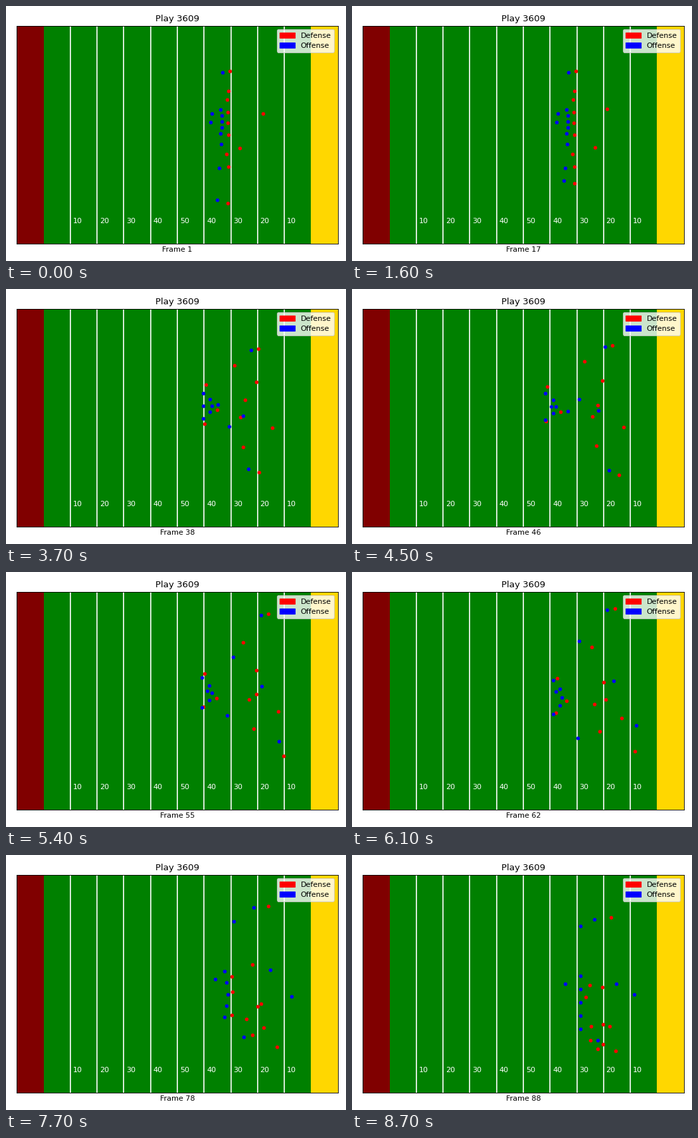
Animation of 512x384 px, one loop 8.8 s. Source, as a matplotlib script:

```python
import numpy as np
import matplotlib.pyplot as plt
from matplotlib.animation import FuncAnimation
from matplotlib.patches import Patch, Rectangle

W, H, DPI = 512, 384, 80
LEFT, RIGHT, TOP, BOTTOM = 16.35, 499.6, 29.6, 358
YARD = (RIGHT - LEFT) / 120
FRAMES, INTERVAL = 88, 100
SNAP, BREAK, END = 16, 45, FRAMES - 1


def route(*keys):
    """Smooth path from rest through (time, x, y) keys, without overshoot."""
    time = np.array([k[0] for k in keys], float)
    pts = np.array([k[1:] for k in keys], float)
    slope = np.diff(pts, axis=0) / np.diff(time)[:, None]
    a, b = slope[:-1], slope[1:]
    same = a * b > 0
    mid = np.where(same, 2 * a * b / np.where(same, a + b, 1), 0)
    tan = np.concatenate([0 * slope[:1], mid, slope[-1:]])

    def at(t):
        t = np.clip(t, time[0], time[-1])
        k = min(np.searchsorted(time, t, side="right"), len(time) - 1) - 1
        h = time[k + 1] - time[k]
        u = (t - time[k]) / h
        s = u * u * (3 - 2 * u)
        return (pts[k] * (1 - s) + pts[k + 1] * s
                + h * u * (1 - u) * ((1 - u) * tan[k] - u * tan[k + 1]))
    return at


def shadow(mark, gap, last_gap, leave):
    """Man coverage: keep a gap to the mark, then drift to another one."""
    gap, last_gap = np.array(gap), np.array(last_gap)

    def at(t):
        u = np.clip((t - leave) / (END - leave), 0, 1)
        return mark(t) + gap + (last_gap - gap) * u * u * (3 - 2 * u)
    return at


def blocker(i):
    """Lineman i places from the center; the line bows into a pocket."""
    def at(t):
        x, y = line_center(t)
        bow, spread = line_shape(t)
        return np.array([x - bow * i * i, y + spread * i])
    return at


line_center = route((SNAP, 325, 174), (BREAK, 307, 177), (END, 344, 222))
line_shape = route((SNAP, 0.5, 9), (BREAK, 4, 10), (END, 0, 20))

passer = route((SNAP, 308, 174.5), (32, 297, 175.5), (67, 309.5, 181.5), (END, 321, 193.5))
runner = route((SNAP, 310, 161.5), (BREAK, 325, 184), (67, 347, 266.5), (END, 370, 278.5))
wide = route((SNAP, 326, 100), (BREAK, 381, 86.5), (59, 384, 57), (END, 365, 97))
seam = route((SNAP, 324, 207.5), (BREAK, 371, 183), (67, 397, 160.5), (END, 398, 193.5))
cross = route((SNAP, 321, 244), (30, 328.5, 233), (BREAK, 341.5, 166),
              (67, 342.5, 95), (END, 343.5, 107))
motion = route((0, 318, 292), (SNAP, 318.5, 262.5), (BREAK, 387, 273),
               (67, 434, 219), (END, 424.5, 209.5))

offense = [blocker(i) for i in range(-2, 3)]
offense += [passer, runner, wide, seam, cross, motion]

rush = [
    route((SNAP, 332.5, 140.5), (BREAK, 294, 146.5), (END, 358, 196)),
    route((SNAP, 333.5, 176), (BREAK, 314, 185), (END, 351.5, 213.5)),
    route((SNAP, 332, 223), (BREAK, 291.5, 198.5), (END, 359.5, 257.5)),
]
zone = [
    route((SNAP, 335, 128), (54, 356.5, 105.5), (END, 377, 199)),
    route((SNAP, 335, 194), (54, 366, 191.5), (END, 359, 279)),
    route((SNAP, 335, 242), (54, 373, 235.5), (END, 370, 292)),
    route((0, 351.5, 214), (50, 411, 208), (END, 377.5, 284.5)),
    route((0, 386.5, 162), (BREAK, 376.5, 138), (END, 387.5, 257.5)),
]
man = [
    shadow(wide, (11, -2), (25, -3), 54),
    shadow(motion, (16, 4.5), (-28, 85), 40),
    shadow(seam, (9.5, -48), (-20.5, 61.5), SNAP),
]
defense = rush + zone + man


def yard_x(yard):
    return LEFT + yard * YARD


def band(start, end, color):
    ax.add_patch(Rectangle((yard_x(start), TOP), (end - start) * YARD,
                           BOTTOM - TOP, facecolor=color, linewidth=0))


plt.rcParams["font.family"] = "DejaVu Sans"
fig = plt.figure(figsize=(W / DPI, H / DPI), dpi=DPI)
ax = fig.add_axes([LEFT / W, 1 - BOTTOM / H, (RIGHT - LEFT) / W, (BOTTOM - TOP) / H])
ax.set(xlim=(LEFT, RIGHT), ylim=(BOTTOM, TOP), xticks=[], yticks=[])
ax.set_title("Play 3609", fontsize=12)
label = ax.set_xlabel("Frame 1", fontsize=10)

band(0, 120, "green")
band(0, 10, "maroon")
band(110, 120, "gold")
for yard in range(20, 110, 10):
    ax.plot([yard_x(yard)] * 2, [TOP, BOTTOM], color="white", linewidth=1.5)
    ax.text(yard_x(yard + 0.95), 327.2, str(min(yard, 120 - yard) - 10),
            color="white", fontsize=10)

teams = [(players, ax.plot([], [], "o", color=color, markersize=4)[0])
         for players, color in ((defense, "red"), (offense, "blue"))]

ax.legend(handles=[Patch(color="red", label="Defense"),
                   Patch(color="blue", label="Offense")],
          loc="upper right", fontsize=10)


def update(n):
    for players, dots in teams:
        dots.set_data(*np.transpose([at(n) for at in players]))
    label.set_text(f"Frame {n + 1}")
    return [label] + [dots for _, dots in teams]


anim = FuncAnimation(fig, update, frames=FRAMES, interval=INTERVAL,
                     repeat=True, repeat_delay=0, blit=False)
plt.show()
```
